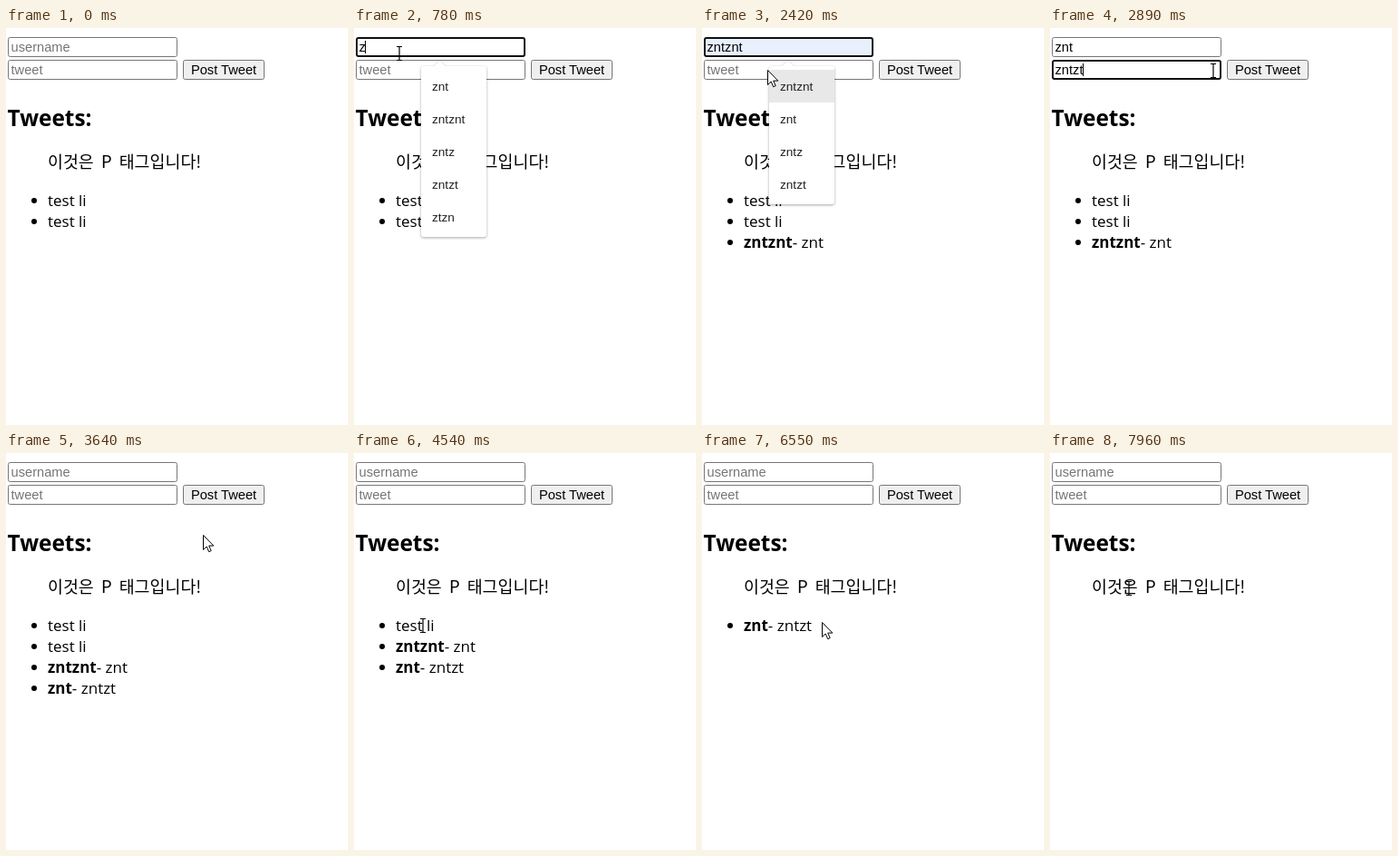
An HTML page that plays this animation: 377 px wide and 437 px high, repeating every 8000 ms.

```html
<!DOCTYPE html>
<html lang="ko">
<head>
<meta charset="utf-8">
<style>
html, body { margin: 0; width: 100%; height: 100%; overflow: hidden; background: #fff; }
svg { display: block; width: 377px; height: 437px; }
.ui { font: 14.67px "Liberation Sans", Arial, sans-serif; }
.hint { fill: #757575; }
.item { font: 13.6px "Liberation Sans", Arial, sans-serif; fill: #222; }
.li { font: 17px "Open Sans", "Noto Sans", sans-serif; white-space: pre; }
.b { font-weight: 700; }
.head { font: 700 24.4px "Open Sans", "Noto Sans", sans-serif; }
.para { font: 18.4px "Noto Sans CJK KR", "Noto Sans CJK", sans-serif; word-spacing: 3px; }
.menu { filter: drop-shadow(0 1px 1.5px rgba(0,0,0,.35)); }
</style>
</head>
<body>
<svg viewBox="0 0 377 437">
  <g id="form"></g>
  <rect id="btn" x="195.5" y="35.5" width="89" height="21" rx="2" stroke="#767676"/>
  <text class="ui" x="240" y="51" text-anchor="middle">Post Tweet</text>
  <text class="head" x="1.5" y="108">Tweets:</text>
  <text class="para" x="46" y="154">이것은 P 태그입니다!</text>
  <g id="list"></g>
  <g id="menu"></g>
  <g id="mouse">
    <path id="arrow" d="M.5 .5V16.5L4.2 13 6.7 18.7 9.2 17.6 6.7 12.1H11.8Z" fill="#fff" stroke="#000"/>
    <path id="beam" d="M-3 -7.5H3M0 -7.5V7.5M-3 7.5H3" fill="none" stroke="#000" stroke-width="1.2"/>
  </g>
</svg>
<script>
const LOOP = 8000, SENT = 1725;
const $ = id => document.getElementById(id);

const NOTES = ["znt", "zntznt", "zntntznt", "zntz", "zntzt", "ztzn"];
const USERS = NOTES.filter(name => name !== "zntntznt");
const FEW = NOTES.slice(0, 4);
const AGAIN = ["zntznt", "znt", "zntz", "zntzt"];
const T = ["", "test li"], A = ["zntznt", "znt"], B = ["znt", "zntzt"];
const CLEAR = { user: "", note: "", focus: "", menu: null, hover: "", filled: false };

// One key every 70 ms; the menu narrows as menus[n] says
const type = (at, key, text, menus) => [...text].map((c, n) =>
  [at + 70 * n, { [key]: text.slice(0, n + 1), menu: menus[Math.min(n, menus.length - 1)] }]);

const steps = [
  [0, { ...CLEAR, list: [T, T] }],
  [430, { focus: "user" }],
  ...type(640, "user", "z", [USERS]),
  [990, { user: "zntznt", hover: "zntznt", filled: true }],
  [1060, { menu: null, hover: "" }],
  [1190, { focus: "note" }],
  ...type(1260, "note", "znt", [NOTES, FEW]),
  [SENT, { ...CLEAR, list: [T, T, A] }],
  [2080, { focus: "user" }],
  ...type(2220, "user", "znt", [USERS, AGAIN]),
  [2410, { user: "zntznt", hover: "zntznt", filled: true }],
  [2490, { ...CLEAR, user: "znt", focus: "note" }],
  ...type(2560, "note", "zntzt", [NOTES, NOTES, FEW, FEW, null]),
  [3100, { ...CLEAR, list: [T, T, A, B] }],
  [4400, { list: [T, A, B] }],
  [4900, { list: [A, B] }],
  [6340, { list: [B] }],
  [7150, { list: [] }]
];
let state = {};
const states = steps.map(([at, change]) => state = { ...state, ...change, at });

// Mouse moves: begin, end, x, y
const moves = [
  [0, 70, 340, 418], [70, 210, 250, 190], [210, 350, 90, 4], [350, 430, 50, 28],
  [860, 990, 100, 98], [1070, 1190, 62, 46], [1400, 1650, 258, 49],
  [1790, 2080, 56, 22], [2340, 2410, 72, 46], [2800, 2960, 262, 48],
  [3300, 3600, 217, 90], [3680, 3790, 177, 155], [3860, 4200, 76, 190],
  [5100, 5390, 78, 206], [5520, 5850, 62, 196], [5850, 6280, 75, 190],
  [6360, 6550, 132, 186], [6810, 6890, 99, 197], [7150, 7290, 91, 191],
  [7610, 7690, 77, 161], [7880, 7950, 87, 149]
];

function field(key, y, hint, s) {
  const text = s[key], on = s.focus === key;
  const fill = key === "user" && s.filled ? "#e8f0fe" : "#fff";
  const box = on
    ? `x="3" y="${y + 1}" width="185" height="20" stroke="#101010" stroke-width="2"`
    : `x="2.5" y="${y + .5}" width="186" height="21" stroke="#767676"`;
  return `<rect ${box} rx="2" fill="${fill}"/>` +
    `<text class="ui ${text ? "" : "hint"}" x="5.5" y="${y + 16}">${text || hint}</text>` +
    (on && !s.hover ? `<path class="caret" d="M6 ${y + 4}v14" stroke="#000"/>` : "");
}

function menu(items, key, hover) {
  const [top, w] = key === "user" ? [42, 72] : [67, 83];
  const rows = items.map((name, n) => {
    const y = top + 4 + 36 * n;
    return (name === hover ? `<rect x="74" y="${y}" width="${w}" height="36" fill="#e8e8e8"/>` : "") +
      `<text class="item" x="86" y="${y + 23}">${name}</text>`;
  });
  return `<g class="menu"><rect x="74" y="${top}" width="${w}" height="${items.length * 36 + 8}" rx="3" fill="#fff"/>` +
    `<path d="M87 ${top + 1}l7.5-7 7.5 7z" fill="#fff"/></g>` + rows.join("");
}

function row([name, text], n) {
  const y = 190 + 23 * n;
  return `<circle cx="31" cy="${y}" r="3"/><text class="li" x="46" y="${y + 6}">` +
    (name ? `<tspan class="b">${name}</tspan>- ` : "") + `${text}</text>`;
}

function show(s) {
  $("form").innerHTML = field("user", 10, "username", s) + field("note", 35, "tweet", s);
  const caret = document.querySelector(".caret");
  if (caret && s[s.focus]) {
    const w = caret.previousElementSibling.getComputedTextLength();
    caret.setAttribute("transform", `translate(${Math.round(w) - .5} 0)`);
  }
  $("list").innerHTML = s.list.map(row).join("");
  $("menu").innerHTML = s.menu ? menu(s.menu, s.focus, s.hover)
    : s.at === SENT ? menu(FEW, "note", "") : "";
}

const inside = (x, y, l, t, r, b) => x > l && x < r && y > t && y < b;

function overText(x, y, s) {
  if (s.hover || (s.menu && x > 73 && y > 42)) return false;
  return inside(x, y, 2, 10, 189, 57) || inside(x, y, 46, 138, 214, 158) ||
    inside(x, y, 46, 180, 124, 180 + 23 * s.list.length);
}

function moveMouse(t, s) {
  const i = moves.findLastIndex(m => m[0] <= t);
  const [t0, t1, x1, y1] = moves[i], [, , x0, y0] = moves[Math.max(0, i - 1)];
  const p = Math.min(1, (t - t0) / (t1 - t0));
  const x = Math.round(x0 + (x1 - x0) * p), y = Math.round(y0 + (y1 - y0) * p);
  const text = overText(x, y, s);
  $("mouse").setAttribute("transform", `translate(${x} ${y})`);
  $("mouse").style.display = i ? "" : "none";
  $("beam").style.display = text ? "" : "none";
  $("arrow").style.display = text ? "none" : "";
  $("btn").setAttribute("fill", inside(x, y, 195, 35, 285, 57) ? "#e3e3e3" : "#efefef");
}

let shown = null;
const start = performance.now();
function frame(now) {
  const t = Math.max(0, now - start) % LOOP;
  const s = states.findLast(k => k.at <= t);
  if (s !== shown) show(shown = s);
  $("menu").setAttribute("opacity", s.at === SENT ? Math.max(0, .6 * (1 - (t - SENT) / 110)) : 1);
  moveMouse(t, s);
  requestAnimationFrame(frame);
}
frame(start);
</script>
</body>
</html>
```
